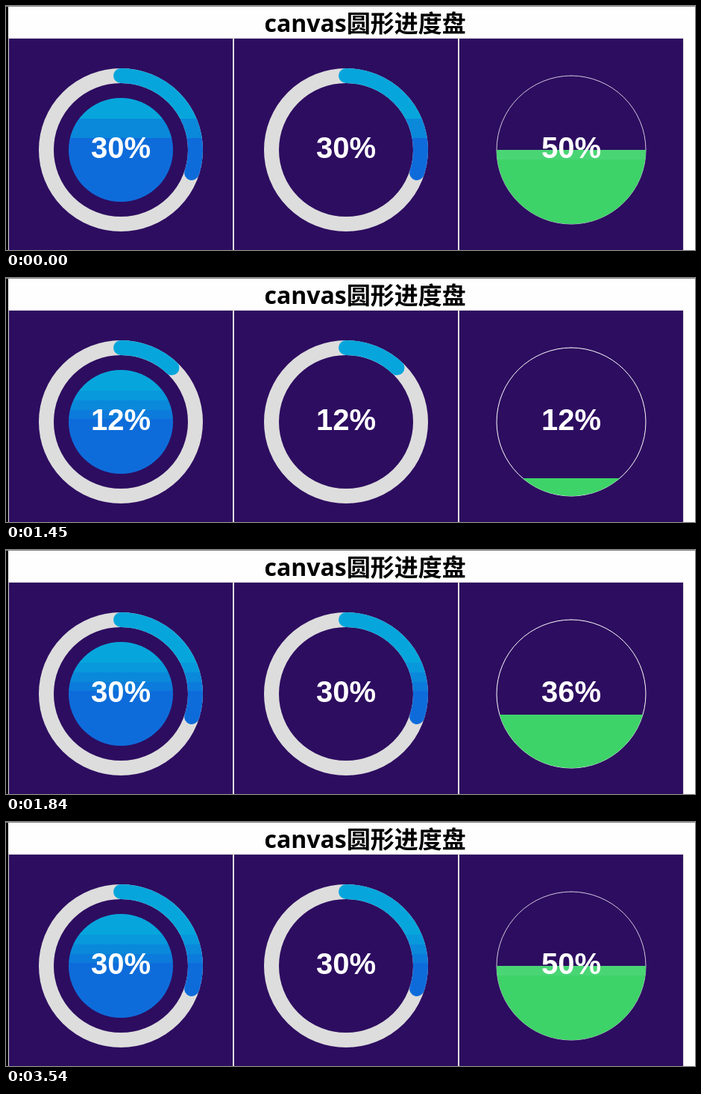
Write an HTML page with a canvas that moves like this. It is 924 px wide and 329 px high and loops after 3.64 s.

```html
<!DOCTYPE html>
<html lang="zh-CN">
<head>
<meta charset="utf-8">
<title>canvas圆形进度盘</title>
<style>
  html, body { margin: 0; width: 100%; height: 100%; overflow: hidden; background: #fefefe; }
  canvas { display: block; }
</style>
</head>
<body>
<canvas id="stage" width="924" height="329"></canvas>
<script>
const ctx = document.getElementById('stage').getContext('2d');
const LOOP = 3640;
const CENTER_Y = 194;
// [start ms, counter value]
const STEPS = [[0, 50], [1090, 1], [1210, 3], [1330, 7], [1450, 12], [1570, 19],
               [1690, 27], [1840, 36], [1990, 45], [2110, 50]];
const CYAN = [6, 166, 220], BLUE = [14, 108, 218];

function rect(color, x, y, w, h) {
  ctx.fillStyle = color;
  ctx.fillRect(x, y, w, h);
}

function ring(x, color, width, from = 0, to = 1) {
  ctx.beginPath();
  ctx.arc(x, CENTER_Y, 100, (from * 2 - 0.5) * Math.PI, (to * 2 - 0.5) * Math.PI);
  ctx.strokeStyle = color;
  ctx.lineWidth = width;
  ctx.stroke();
}

function label(x, value) {
  ctx.font = 'bold 40px Arial, "Liberation Sans", sans-serif';
  ctx.textAlign = 'center';
  ctx.fillStyle = '#fff';
  ctx.fillText(value + '%', x, 205);
}

// Cyan to blue in flat bands
function bandedBlue(top, bands, height) {
  const gradient = ctx.createLinearGradient(0, 0, 0, 329);
  for (let i = 0; i <= bands + 1; i++) {
    const mix = i / (bands + 1);
    const color = `rgb(${CYAN.map((c, k) => Math.round(c + (BLUE[k] - c) * mix))})`;
    gradient.addColorStop(i ? (top + (i - 1) * height) / 329 : 0, color);
    gradient.addColorStop(i > bands ? 1 : (top + i * height) / 329, color);
  }
  return gradient;
}

function dial(x, value, paint, disc) {
  ctx.lineCap = 'butt';
  ring(x, '#ddd', 20);
  ctx.lineCap = 'round';
  ring(x, paint, 20, 0, value / 100);
  if (disc) {
    ctx.beginPath();
    ctx.arc(x, CENTER_Y, 70, 0, 2 * Math.PI);
    ctx.fillStyle = paint;
    ctx.fill();
  }
  label(x, value);
}

function tank(x, value) {
  const full = value === 50;
  const level = CENTER_Y + 100 - 2 * value;
  ring(x, full ? '#d2c9dc' : '#fff', 1);
  ctx.save();
  ctx.beginPath();
  ctx.arc(x, CENTER_Y, 100, 0, 2 * Math.PI);
  ctx.clip();
  rect('#3dd368', x - 101, level, 202, 2 * value + 1);
  if (full) rect('#4ad575', x - 101, level, 202, 13);
  ctx.restore();
  label(x, value);
}

function page() {
  rect('#fefefe', 0, 0, 924, 329);
  rect('#888', 0, 0, 924, 1);
  rect('#000', 0, 1, 3, 328);
  ctx.font = 'bold 32px "Noto Sans", "Noto Sans CJK SC", "Noto Sans CJK", sans-serif';
  ctx.textAlign = 'left';
  ctx.fillStyle = '#000';
  ctx.fillText('canvas圆形进度盘', 346.5, 35);
  for (const x of [4, 306, 608]) {
    rect('#ddd', x - 1, 43, 302, 286);
    rect('#2d0d60', x, 44, 300, 285);
  }
}

function draw(now) {
  const time = now % LOOP;
  const value = STEPS.findLast(([start]) => start <= time)[1];
  const part = Math.min(value, 30);
  const paint = time < 1090 ? bandedBlue(152, 1, 26)
    : time < 1210 ? bandedBlue(146, 7, 6.4)
    : bandedBlue(152, 3, 12.8);
  page();
  dial(154, part, paint, true);
  dial(456, part, paint, false);
  tank(758, value);
}

const begin = performance.now();
function tick() {
  draw(performance.now() - begin);
  requestAnimationFrame(tick);
}
tick();
</script>
</body>
</html>
```
